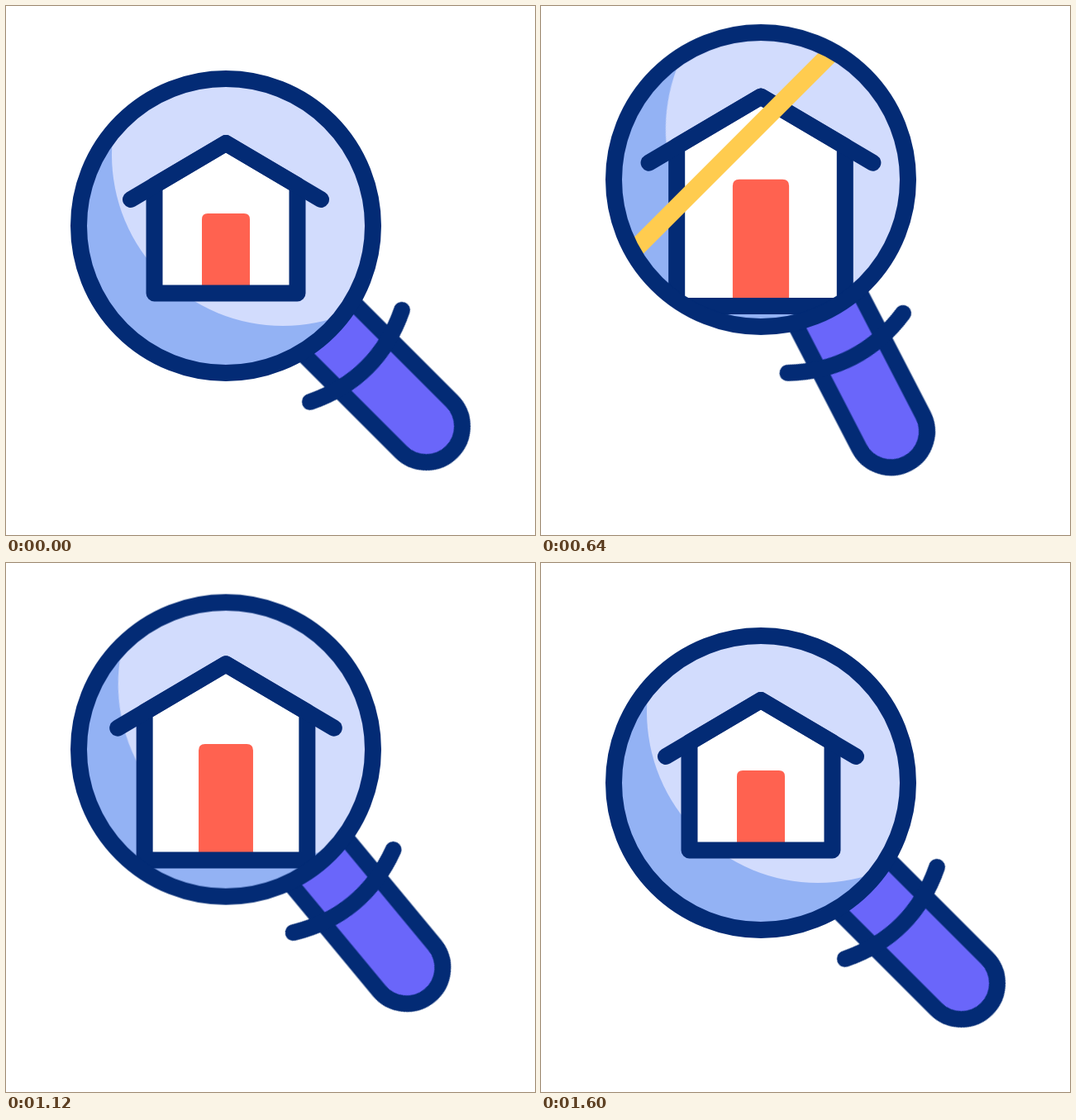
Animation of 640 by 640 pixels, one loop 1680 ms. Source, as an HTML page without scripts:

```html
<!DOCTYPE html>
<html lang="en">
<head>
<meta charset="utf-8">
<title>House search</title>
<style>
  html, body { margin: 0; width: 100%; height: 100%; overflow: hidden; background: #fff; }
  svg { display: block; width: 640px; height: 640px; }

  .line { fill: none; stroke: #032b75; stroke-width: 20; stroke-linecap: round; stroke-linejoin: round; }
  .grip { fill: #6a66fa; }
  .wall { fill: #fff; }
  .door { fill: #ff6250; }
  .glint { stroke: #ffcc4f; stroke-width: 22; }

  .lift, .turn, .wall, .roof, .door {
    animation: 1680ms cubic-bezier(.56, 0, .44, 1) infinite;
  }
  .lift { animation-name: lift; }
  .turn { animation-name: turn; transform-origin: 266px 266px; }
  .wall { animation-name: wall; }
  .roof { animation-name: roof; }
  .door { animation-name: door; }
  .glint { animation: sweep 1680ms linear infinite; }

  @keyframes lift {
    0%, 4.762%, 93.1%, 100% { transform: translateY(0); }
    47.619% { transform: translateY(-60px); }
  }
  @keyframes turn {
    0%, 4.762%, 82.143%, 100% { transform: rotate(0deg); }
    42.857%, 44.048% { transform: rotate(18deg); }
  }
  /* The house widens while its upper part rises away from the base. */
  @keyframes wall {
    0%, 7.143%, 91.667%, 100% { d: path("M179.5 347.5V217L266 166L352.5 217V347.5Z"); }
    49.405% { d: path("M162.4 364.8V164.2L266 103.1L369.6 164.2V364.8Z"); }
  }
  @keyframes roof {
    0%, 7.143%, 91.667%, 100% { d: path("M151 234L266 166L381 234"); }
    49.405% { d: path("M128.2 184.5L266 103.1L403.8 184.5"); }
  }
  @keyframes door {
    0%, 7.143%, 91.667%, 100% { d: path("M237 347.5V258Q237 251 244 251H288Q295 251 295 258V347.5Z"); }
    49.405% { d: path("M231.3 364.8V212.9Q231.3 204.9 239.3 204.9H292.7Q300.7 204.9 300.7 212.9V364.8Z"); }
  }
  @keyframes sweep {
    0%, 30.952% { transform: translate(-140px, -140px); }
    50%, 100% { transform: translate(140px, 140px); }
  }
</style>
</head>
<body>
<svg viewBox="0 0 640 640">
  <defs>
    <clipPath id="lens"><circle cx="266" cy="266" r="178"/></clipPath>
    <clipPath id="movingLens"><circle class="lift" cx="266" cy="266" r="178"/></clipPath>
  </defs>

  <g class="lift">
    <g class="turn">
      <g transform="translate(266 266) rotate(45)">
        <path class="line grip" style="fill:#6a66fa" d="M170 -43.5H343A43.5 43.5 0 0 1 343 43.5H170Z"/>
        <path class="line" d="M222.7 -78.5Q260.7 0 222.7 78.5"/>
      </g>
      <circle cx="266" cy="266" r="178" fill="#93b2f4"/>
      <g clip-path="url(#lens)">
        <circle cx="335" cy="180" r="207" fill="#d2dcfd"/>
      </g>
    </g>
  </g>

  <g clip-path="url(#movingLens)">
    <path class="wall" d="M179.5 347.5V217L266 166L352.5 217V347.5Z"/>
    <path class="door" d="M237 347.5V258Q237 251 244 251H288Q295 251 295 258V347.5Z"/>
    <path class="line wall" style="fill:none" d="M179.5 347.5V217L266 166L352.5 217V347.5Z"/>
    <path class="line roof" d="M151 234L266 166L381 234"/>
    <g class="lift">
      <path class="glint" d="M66 466L466 66"/>
    </g>
  </g>

  <circle class="line lift" cx="266" cy="266" r="178"/>
</svg>
</body>
</html>
```
